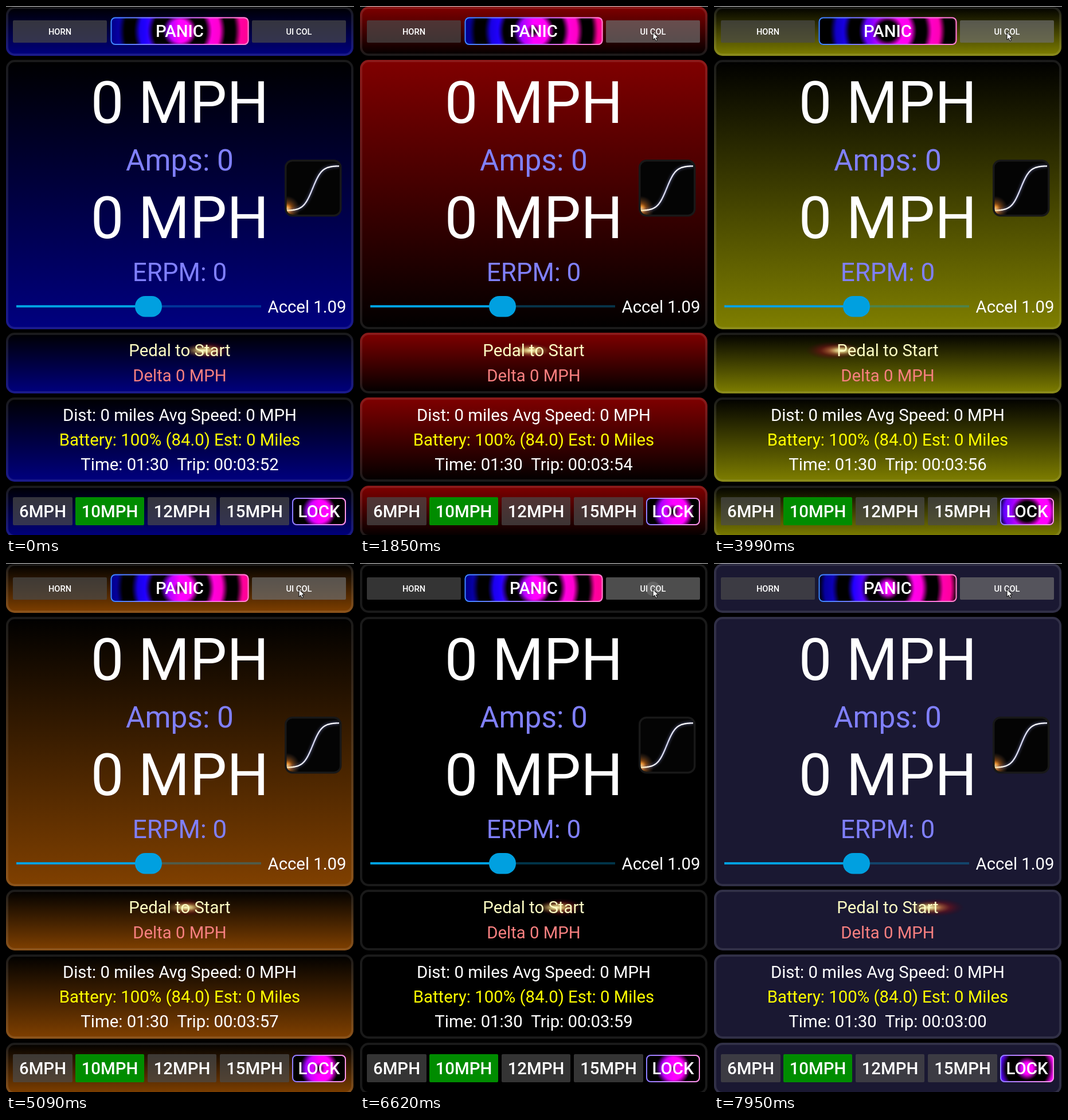
These frames come from a looping animation (607x923 px, 8000 ms). An HTML page with a canvas:

```html
<!DOCTYPE html>
<html lang="en">
<head>
<meta charset="utf-8">
<title>Ride dashboard</title>
<style>
  html, body { margin: 0; width: 100%; height: 100%; overflow: hidden; background: #000; }
  canvas { display: block; }
</style>
</head>
<body>
<canvas id="stage" width="607" height="923"></canvas>
<script>
const ctx = document.getElementById('stage').getContext('2d');
const LOOP = 8000;
const PULSE = 0.605; // cycles per second, shared by the rings and the flare
const TAU = Math.PI * 2;
const MID = 303;
const EM = 29.33; // base text size

// Panel themes: start time, top colour, bottom colour
const THEMES = [
  [0, '#000', '#000080'],
  [1350, '#800000', '#000'],
  [3170, '#000', '#7f7f00'],
  [4550, '#000', '#804000'],
  [5600, '#000', '#000'],
  [6720, '#000', '#1a1832'],
  [7640, '#1a1832', '#1a1832']
];
const PANELS = [[1, 87], [94, 564], [570, 676], [683, 830], [837, 927]];
const PRESETS = [['6MPH', 12, 104], ['10MPH', 121, 120], ['12MPH', 247, 120], ['15MPH', 373, 121]];
const CURSOR = [[0, 0], [0, 13], [3, 10.3], [5.2, 15], [7.4, 14], [5.3, 9.5], [9.2, 9.2]];

const clamp = (v, lo = 0, hi = 1) => Math.min(hi, Math.max(lo, v));

function roundRect(x, y, w, h, r) {
  ctx.beginPath();
  ctx.roundRect(x, y, w, h, r);
}

function text(str, x, baseline, size = EM, color = '#fff', weight = 400, align = 'center') {
  ctx.font = `${weight} ${size}px Roboto, sans-serif`;
  ctx.textAlign = align;
  ctx.fillStyle = color;
  ctx.fillText(str, x, baseline);
}

function gradient(x0, y0, x1, y1, stops) {
  const g = ctx.createLinearGradient(x0, y0, x1, y1);
  stops.forEach(([at, color]) => g.addColorStop(at, color));
  return g;
}

function panel([top, bottom], [, from, to]) {
  roundRect(0, top, 606, bottom - top, 15);
  ctx.fillStyle = gradient(0, top, 0, bottom, [[0, from], [1, to]]);
  ctx.fill();
  roundRect(2, top + 2, 602, bottom - top - 4, 13);
  ctx.strokeStyle = 'rgba(255,255,255,.1)';
  ctx.lineWidth = 4;
  ctx.stroke();
}

function button(label, x, y, w, h, size, fill = 'rgba(74,74,74,.7)') {
  roundRect(x, y, w, h, 2);
  ctx.fillStyle = fill;
  ctx.fill();
  text(label, x + w / 2, y + h / 2 + size * 0.355, size, '#fff', 500);
}

// Colour band with black rings spreading out from its centre
function ringButton(label, x, y, w, h, colors, edge, phase) {
  const cx = x + w / 2, cy = y + h / 2, reach = w / 2 + 6, wave = 50;
  const rings = ctx.createRadialGradient(cx, cy, 0, cx, cy, reach);
  for (let i = 0; i <= 60; i++) {
    const r = reach * i / 60;
    const light = clamp(0.43 + 0.8 * Math.cos(TAU * (r / wave - phase)));
    rings.addColorStop(i / 60, `rgba(0,0,0,${(1 - light).toFixed(3)})`);
  }
  roundRect(x, y, w, h, 8);
  for (const fill of [gradient(x, 0, x + w, 0, colors), rings]) {
    ctx.fillStyle = fill;
    ctx.fill();
  }
  roundRect(x + 1, y + 1, w - 2, h - 2, 7);
  ctx.strokeStyle = gradient(x, 0, x + w, 0, edge);
  ctx.lineWidth = 2;
  ctx.stroke();
  text(label, cx, cy + EM * 0.355, EM, '#fff', 500);
}

function glow(x, y, rx, ry, stops) {
  ctx.save();
  ctx.translate(x, y);
  ctx.scale(rx, ry);
  const g = ctx.createRadialGradient(0, 0, 0, 0, 0, 1);
  stops.forEach(([at, color]) => g.addColorStop(at, color));
  ctx.fillStyle = g;
  ctx.beginPath();
  ctx.arc(0, 0, 1, 0, TAU);
  ctx.fill();
  ctx.restore();
}

function flare(t) {
  const cycle = (t * PULSE + 0.135) % 1;
  const u = 4 * Math.abs(cycle - 0.5) - 1;
  const x = 300 + 97 * u;
  glow(x + 18 * u, 601, 30 + 22 * Math.abs(u), 16,
    [[0, 'rgba(190,50,45,.8)'], [0.5, 'rgba(120,15,25,.55)'], [1, 'rgba(60,0,20,0)']]);
  glow(x, 601, 36, 11,
    [[0, 'rgba(255,255,200,1)'], [0.3, 'rgba(225,222,135,.75)'], [0.6, 'rgba(180,165,80,.35)'], [1, 'rgba(130,110,40,0)']]);
}

function curveIcon() {
  roundRect(486, 268, 99.5, 99.5, 14);
  ctx.fillStyle = '#181818';
  ctx.fill();
  ctx.save();
  roundRect(489.5, 271.5, 92.5, 92.5, 10);
  ctx.fillStyle = '#040404';
  ctx.fill();
  ctx.clip();
  glow(490, 354, 23, 23, [[0, '#ffd890'], [0.2, '#e89030'], [0.42, 'rgba(150,80,20,.8)'],
    [0.7, 'rgba(80,50,25,.6)'], [0.85, 'rgba(45,30,20,.5)'], [1, 'rgba(30,20,15,0)']]);
  ctx.beginPath();
  for (let x = 489; x <= 581; x++) ctx.lineTo(x, 357 - 78 / (1 + Math.exp((535 - x) / 8)));
  ctx.strokeStyle = gradient(489, 0, 581, 0, [[0, '#ffe2a0'], [0.2, '#fff'], [0.5, '#d4d6f0'], [0.8, '#fff'], [1, '#f4f4ff']]);
  ctx.lineWidth = 2.3;
  ctx.shadowColor = '#7880b8';
  ctx.shadowBlur = 5;
  ctx.stroke();
  ctx.restore();
}

function slider() {
  ctx.fillStyle = 'rgba(0,160,224,.32)';
  ctx.fillRect(248, 522, 197, 4);
  ctx.fillStyle = '#00a0e0';
  ctx.fillRect(18, 522, 230, 4);
  roundRect(225, 506, 47, 36.5, 18);
  ctx.fill();
  text('Accel 1.09', 593.5, 535, EM, '#fff', 400, 'right');
}

function pointer(ms) {
  if (ms < 750) return;
  const left = (1 - clamp((ms - 750) / 300)) ** 3;
  const x = 511 + 76 * left, y = 46 + 16 * left;
  for (const [at] of THEMES.slice(1)) {
    const age = ms - at;
    if (age < -120 || age > 80) continue;
    const press = clamp((age + 120) / 40);
    ctx.fillStyle = press < 0.8 ? 'rgba(200,200,200,.2)' : 'rgba(205,175,40,.7)';
    ctx.beginPath();
    ctx.arc(511, 45, 15 - 5 * press, 0, TAU);
    ctx.fill();
  }
  ctx.beginPath();
  CURSOR.forEach(([dx, dy]) => ctx.lineTo(x + dx, y + dy));
  ctx.closePath();
  ctx.fillStyle = '#fff';
  ctx.fill();
  ctx.strokeStyle = '#000';
  ctx.lineWidth = 1;
  ctx.stroke();
}

function draw(ms) {
  const t = ms / 1000;
  const theme = THEMES.filter(([at]) => at <= ms).pop();
  const phase = 0.26 + PULSE * t;
  ctx.fillStyle = '#000';
  ctx.fillRect(0, 0, 607, 923);
  PANELS.forEach(p => panel(p, theme));
  ctx.fillStyle = '#d0d0d0';
  ctx.fillRect(0, 0, 607, 1);

  button('HORN', 12, 25, 164, 39, EM / 2);
  const hover = 74 + 36 * clamp((ms - 770) / 150);
  button('UI COL', 429, 25, 164, 39, EM / 2, `rgba(${hover},${hover},${hover},.7)`);
  ringButton('PANIC', 182.5, 19.5, 241, 48.5,
    [[0, '#000088'], [0.25, '#2000ff'], [0.38, '#8000ff'], [0.5, '#f0f'], [0.7, '#ff00e8'], [1, '#ff0090']],
    [[0, '#3c88ff'], [0.5, '#b070ff'], [0.75, '#ff70e8'], [1, '#ff88d0']], phase);

  for (const base of [204, 405]) text('0 MPH', MID, base, EM * 3.5);
  text('Amps: 0', MID, 287, EM * 1.75, '#8080ff');
  text('ERPM: 0', MID, 480, EM * 1.5, '#8080ff');
  curveIcon();
  slider();

  flare(t);
  text('Pedal to Start', MID, 611, EM, '#ffffc4');
  text('Delta 0 MPH', MID, 654.5, EM, '#f88080');

  const seconds = String(Math.floor(52.6 + t) % 60).padStart(2, '0');
  text('Dist: 0 miles Avg Speed: 0 MPH', MID, 724);
  text('Battery: 100% (84.0) Est: 0 Miles', MID, 766.5, EM, '#ff0');
  text(`Time: 01:30\u00a0 Trip: 00:03:${seconds}`, MID, 809.5);

  PRESETS.forEach(([label, x, w]) =>
    button(label, x, 857, w, 49, EM, label === '10MPH' ? '#008c00' : undefined));
  ringButton('LOCK', 499, 858, 94, 48,
    [[0, '#4800ff'], [0.4, '#e000ff'], [0.5, '#f0f'], [1, '#f0f']],
    [[0, '#8c80ff'], [0.5, '#d880ff'], [1, '#ff98e8']], phase);
  pointer(ms);
}

let start;
function tick(now) {
  start ??= now;
  draw((now - start) % LOOP);
  requestAnimationFrame(tick);
}
draw(0);
requestAnimationFrame(tick);
</script>
</body>
</html>
```
